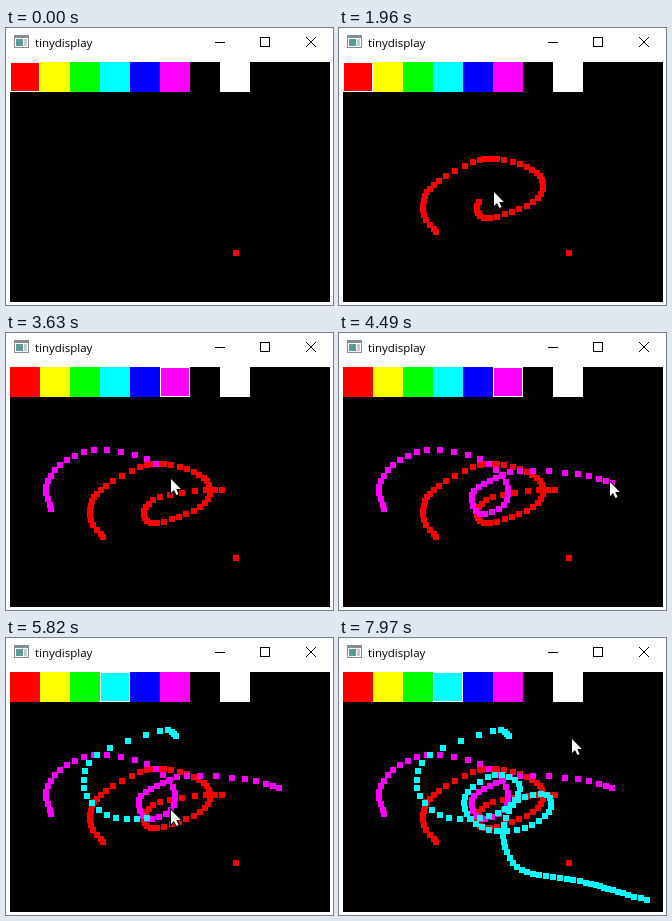
Write an HTML page with a canvas that moves like this. It is 327 px wide and 277 px high and loops after 8 s.

```html
<!DOCTYPE html>
<html>
<head>
<meta charset="utf-8">
<title>tinydisplay</title>
<style>
html, body { margin: 0; width: 100%; height: 100%; overflow: hidden; background: #fff; }
canvas { position: absolute; left: 0; top: 0; }
span { position: absolute; left: 29px; top: 7px; font: 11.5px/16px "Open Sans", sans-serif; color: #000; }
</style>
</head>
<body>
<canvas width="327" height="277"></canvas>
<span>tinydisplay</span>
<script>
const LOOP = 8000, LEAD = 2.3, DOTS_PER_KNOT = 4;
const ctx = document.querySelector('canvas').getContext('2d');
const swatches = ['#f00', '#ff0', '#0f0', '#0ff', '#00f', '#f0f', '#000', '#fff'];

// The screen refreshes in bursts: start, end, steps
const bursts = [[430, 1410, 8], [1560, 2530, 8], [2650, 3630, 8], [3780, 4210, 4],
  [4490, 5430, 8], [5550, 6520, 8], [6670, 7270, 5], [7690, 7970, 3]];

// Dots follow a smooth curve through the knots; pace < 1 slows down, > 1 speeds up
const strokes = [
  { color: '#f00', start: 640, end: 2110, pace: 0.8, last: 54,
    knots: [[97, 204], [85, 187], [86, 168], [100, 153], [134, 134], [158, 131], [188, 139],
      [203, 152], [199, 170], [173, 184], [145, 190], [138, 178], [154, 164], [200, 157],
      [226, 157]] },
  { color: '#f0f', start: 3070, end: 4210, pace: 1.45, last: 48,
    knots: [[45, 176], [40, 154], [54, 132], [88, 117], [141, 126], [167, 149], [165, 172],
      [141, 181], [133, 162], [151, 148], [181, 138], [239, 141], [273, 150]] },
  { color: '#0ff', start: 5430, end: 7270, pace: 0.78, last: 95,
    knots: [[170, 98], [154, 93], [91, 117], [78, 150], [101, 177], [141, 180], [172, 167],
      [180, 146], [156, 137], [129, 154], [128, 176], [150, 192], [186, 190], [210, 174],
      [208, 157], [179, 162], [165, 187], [166, 209], [178, 229], [200, 237], [228, 241],
      [252, 246], [269, 251], [289, 257], [312, 263]] }
];

// Catmull-Rom point at a dot index
function spline(knots, index) {
  const last = knots.length - 1;
  const s = Math.max(0, Math.min(last, index / DOTS_PER_KNOT));
  const i = Math.min(last - 1, Math.floor(s)), u = s - i;
  const k = j => knots[Math.max(0, Math.min(last, i + j))];
  return [0, 1].map(c => {
    const a = k(-1)[c], b = k(0)[c], d = k(1)[c], e = k(2)[c];
    return b + u / 2 * (d - a + u * (2 * a - 5 * b + 4 * d - e + u * (3 * (b - d) + e - a)));
  });
}

// Pointer stops between strokes: time, x, y
const stops = [[430, 140, 241], [2650, 163, 48], [2790, 163, 55], [4490, 271, 149],
  [4893, 109, 50], [5161, 128, 80], [7690, 304, 261], [7970, 233, 101]];
for (const { knots, start, end, last } of strokes)
  stops.push([start, ...knots[0]], [end, ...spline(knots, last)]);
stops.sort((a, b) => a[0] - b[0]);

function pointerAt(t) {
  const i = Math.max(1, stops.findIndex(s => s[0] >= t));
  const [t0, x0, y0] = stops[i - 1], [t1, x1, y1] = stops[i];
  const u = (t - t0) / (t1 - t0);
  return [x0 + (x1 - x0) * u, y0 + (y1 - y0) * u];
}

// Time of the latest screen refresh
function snap(t) {
  let shown = 0;
  for (const [from, to, n] of bursts)
    for (let i = 0; i < n; i++) {
      const step = from + (to - from) * i / (n - 1);
      if (step <= t + 4) shown = step;
    }
  return shown;
}

function rect(color, x, y, w, h) {
  ctx.fillStyle = color;
  ctx.fillRect(x, y, w, h);
}

const dot = (color, x, y) => rect(color, Math.round(x) - 3, Math.round(y) - 3, 6, 6);

function drawWindow() {
  rect('#fff', 0, 0, 327, 277);
  rect('#858c92', 8, 7, 15, 13);
  rect('#fff', 9, 10, 13, 9);
  rect('#5b9a9a', 10, 11, 7, 7);
  rect('#c3ccd2', 18, 11, 3, 7);
  rect('#000', 209, 14, 10, 1);
  ctx.strokeStyle = '#000';
  ctx.lineWidth = 1;
  ctx.strokeRect(254.5, 9.5, 9, 9);
  ctx.beginPath();
  ctx.moveTo(300, 9); ctx.lineTo(310, 19);
  ctx.moveTo(310, 9); ctx.lineTo(300, 19);
  ctx.stroke();
  rect('#000', 4, 34, 320, 240);
}

function drawPalette(selected) {
  swatches.forEach((color, i) => {
    const x = 4 + 30 * i, inset = i === selected ? 1 : 0;
    rect('#fff', x, 34, 30, 30);
    rect(color, x + inset, 34 + inset, 30 - 2 * inset, 30 - 2 * inset);
  });
}

function drawPointer(x, y) {
  ctx.save();
  ctx.translate(Math.round(x), Math.round(y));
  const shape = new Path2D('M0 0V14L3 11L5.5 16L7.5 15L5.3 10H9.8Z');
  ctx.strokeStyle = '#000';
  ctx.lineWidth = 2;
  ctx.stroke(shape);
  ctx.fillStyle = '#fff';
  ctx.fill(shape);
  ctx.restore();
}

function draw(t) {
  drawWindow();
  drawPalette(t < 2650 ? 0 : t < 4890 ? 5 : 3);
  dot('#f00', 230, 225);
  let pointer = t >= 430 && pointerAt(t);
  for (const { color, knots, start, end, pace, last } of strokes) {
    if (t < start) break;
    const head = last * Math.min(1, (t - start) / (end - start)) ** pace;
    for (let i = 0; i <= head; i++) dot(color, ...spline(knots, i));
    if (t < end) pointer = spline(knots, head + LEAD);
  }
  if (pointer) drawPointer(...pointer);
}

function tick(now) {
  draw(snap(now % LOOP));
  requestAnimationFrame(tick);
}
draw(0);
requestAnimationFrame(tick);
</script>
</body>
</html>
```
